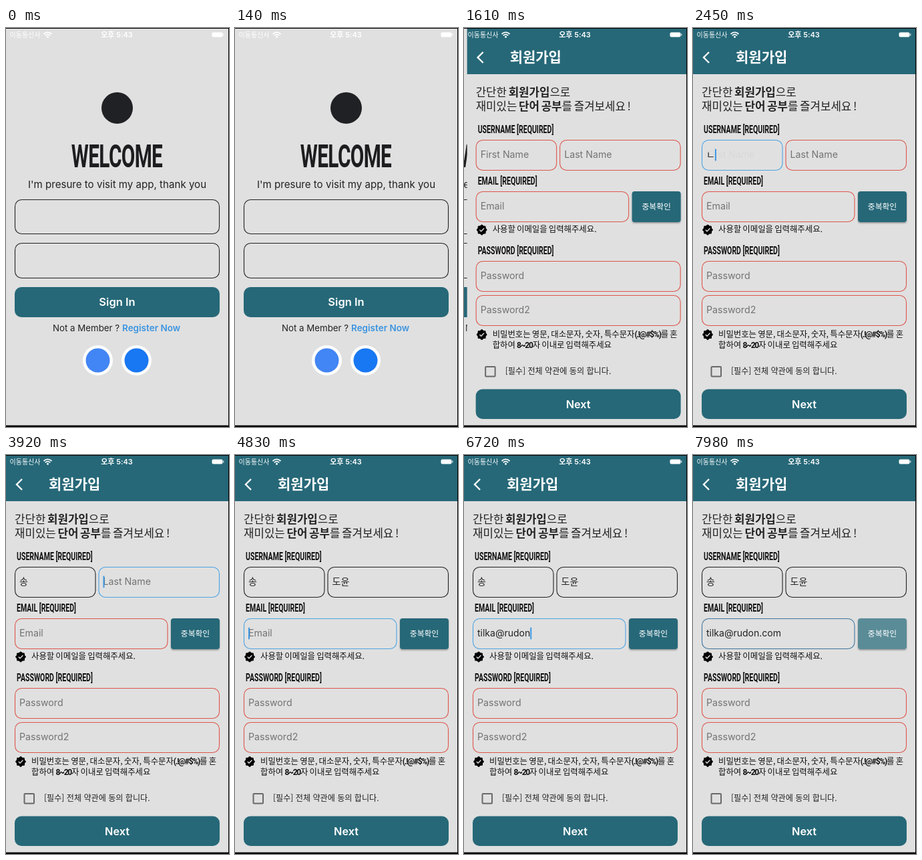
An HTML page for the animation above (8000 ms loop, 334 by 596 pixels).

```html
<!DOCTYPE html>
<html lang="ko">
<head>
<meta charset="utf-8">
<title>Sign up</title>
<style>
  html, body { margin: 0; width: 100%; height: 100%; overflow: hidden; background: #e0e0e0; }
  svg { display: block; width: 334px; height: 596px; font-family: Inter, "Noto Sans CJK KR", "Noto Sans CJK", sans-serif; }
  text { white-space: pre; fill: #222; }
  .ko { font-family: "Noto Sans CJK KR", "Noto Sans CJK", sans-serif; }
  .cond { font: 700 17px Roboto, sans-serif; fill: #111; }
  .box { fill: none; stroke: #222; stroke-width: 1.1; }
  .red { stroke: #dd564c; }
  .teal { fill: #266878; }
  .mid { text-anchor: middle; }
  .in { font-size: 14px; }
  .hint { font-size: 14.2px; fill: #737373; }
  .white { fill: #fff; }
  .semi { font-weight: 600; }
  .bold { font-weight: 700; }
  .lead { font-size: 16.8px; word-spacing: -2px; }
  .note { font-size: 12.4px; font-weight: 500; word-spacing: -1.3px; fill: #111; }
  .sym { font-family: Roboto, sans-serif; font-size: 12px; font-weight: 700; letter-spacing: -1.2px; }
  .cursor { fill: #3b97e3; }
</style>
</head>
<body>
<svg viewBox="0 0 334 596">
  <defs>
    <filter id="drop" x="-10%" y="-10%" width="120%" height="130%">
      <feDropShadow dx="0" dy="1.5" stdDeviation="1.2" flood-opacity=".35"/>
    </filter>
    <g id="badge">
      <rect x="-6" y="-6" width="12" height="12" rx="1.5"/>
      <rect x="-6" y="-6" width="12" height="12" rx="1.5" transform="rotate(45)"/>
      <path d="M-3.2 0 L-1 2.3 L3.4 -2.2" fill="none" stroke="#e0e0e0" stroke-width="1.4"/>
    </g>
  </defs>
  <rect width="334" height="596" fill="#e0e0e0"/>

  <g id="login">
    <circle cx="166.5" cy="119.5" r="23.5" fill="#202124"/>
    <text class="cond mid" transform="translate(166 208) scale(.62 1)" style="font-size:48px;letter-spacing:-1px;fill:#1d1d1f">WELCOME</text>
    <text class="mid" x="166.5" y="239" font-size="15.1">I'm presure to visit my app, thank you</text>
    <rect class="box" x="13.5" y="256.5" width="306" height="51" rx="10"/>
    <rect class="box" x="13.5" y="321.5" width="306" height="52" rx="10"/>
    <rect class="teal" x="13" y="387" width="307" height="45" rx="10"/>
    <text class="mid semi white" x="166.5" y="415" font-size="16.5">Sign In</text>
    <text x="70" y="453" font-size="13.3">Not a Member ?</text>
    <text class="semi" x="174" y="453" font-size="13.5" style="fill:#3b94e0">Register Now</text>
    <circle class="white" cx="137.5" cy="496.5" r="22.5"/>
    <circle cx="137.5" cy="496.5" r="18" fill="#4285f4"/>
    <circle class="white" cx="195.5" cy="496.5" r="22.5"/>
    <circle cx="195.5" cy="496.5" r="18" fill="#1877f2"/>
  </g>

  <g id="form" transform="translate(400)">
    <rect width="334" height="596" fill="#e0e0e0"/>
    <rect class="teal" width="334" height="69"/>
    <path d="M24 36 L16 44 L24 52" fill="none" stroke="#fff" stroke-width="2.4"/>
    <text class="ko bold white" x="64" y="50.5" font-size="21">회원가입</text>
    <text class="ko lead" x="13" y="102">간단한 <tspan class="bold">회원가입</tspan>으로</text>
    <text class="ko lead" x="13" y="123">재미있는 <tspan class="bold">단어 공부</tspan>를 즐겨보세요 !</text>
    <text class="cond" transform="translate(16 157) scale(.62 1)">USERNAME [REQUIRED]</text>
    <text class="cond" transform="translate(16 234) scale(.62 1)">EMAIL [REQUIRED]</text>
    <text class="cond" transform="translate(16 338) scale(.62 1)">PASSWORD [REQUIRED]</text>

    <g id="fields"></g>

    <rect id="check" class="teal" x="247" y="244" width="73" height="46" rx="4" filter="url(#drop)"/>
    <text class="ko mid white" x="283.5" y="271" font-size="11.8">중복확인</text>
    <use href="#badge" x="22" y="301.5"/>
    <text class="ko note" x="38" y="305">사용할 이메일을 입력해주세요.</text>

    <rect class="box red" x="13.5" y="348.5" width="306" height="45" rx="10"/>
    <text class="hint" x="20" y="375">Password</text>
    <rect class="box red" x="13.5" y="399.5" width="306" height="45" rx="10"/>
    <text class="hint" x="20" y="426">Password2</text>
    <use href="#badge" x="22" y="458"/>
    <text class="ko note" x="38" y="462">비밀번호는 영문, 대소문자, 숫자, 특수문자<tspan class="sym">(.!@#$%)</tspan>를 혼</text>
    <text class="ko note" x="38" y="478">합하여 <tspan class="sym">8~20</tspan>자 이내로 입력해주세요</text>

    <rect x="27.5" y="506" width="14.5" height="14.5" rx="1" fill="none" stroke="#696969" stroke-width="2"/>
    <text class="ko" x="57" y="517" font-size="12.1">[필수] 전체 약관에 동의 합니다.</text>
    <rect class="teal" x="13" y="539.5" width="307" height="44.5" rx="10"/>
    <text class="mid semi white" x="166.5" y="567.5" font-size="16.3">Next</text>
  </g>

  <g id="popup" opacity="0">
    <rect x="101" y="254" width="131" height="87" rx="6" fill="#f3f3f3" fill-opacity=".86" filter="url(#drop)"/>
    <path d="M101 298 V260 a6 6 0 0 1 6 -6 H226 a6 6 0 0 1 6 6 V298 Z" fill="#3d92f2"/>
    <text class="mid white" x="166.5" y="282" font-size="15.5">English (US)</text>
    <text class="ko mid" x="166.5" y="326" font-size="15.5">한국어</text>
  </g>

  <g id="status" class="white">
    <text class="ko white" x="5.5" y="14" font-size="10">이동통신사</text>
    <g fill="none" stroke="#fff" stroke-width="1.8">
      <path d="M56.5 9 Q62.5 3.8 68.5 9"/>
      <path d="M58.8 11.3 Q62.5 8 66.2 11.3"/>
    </g>
    <circle cx="62.5" cy="13.2" r="1.5"/>
    <text class="mid semi white" x="166" y="14" font-size="11">오후 5:43</text>
    <rect x="308.5" y="6.5" width="16" height="7" rx="2"/>
    <rect x="325.3" y="8.5" width="1" height="3"/>
  </g>
  <path d="M0 0 H334 V596 H0 V593.5 H333 V1 H0 Z"/>
</svg>
<script>
const LOOP = 8000, STEP = 70;
const RED = [221, 86, 76], BLUE = [77, 163, 226], DARK = [34, 34, 34];
const $ = id => document.getElementById(id);
const clamp = v => Math.max(0, Math.min(1, v));
const mix = (a, b, k) => `rgb(${a.map((v, i) => Math.round(v + (b[i] - v) * k))})`;

const email = 'tilka@rudon.com';
const emailTimes = [5390, 5460, 5530, 5740, 5880, 6020, 6300, 6440, 6510, 6650, 6720, 7140, 7350, 7490, 7700];

const fields = [
  { x: 13.5, y: 167.5, w: 120.5, hint: 'First Name', focus: 2050, blur: 3780,
    typed: [[2380, 'ㄴ'], [2940, ''], [3150, 'ㅅ'], [3220, '소'], [3290, '송']] },
  { x: 139, y: 167.5, w: 180.5, hint: 'Last Name', focus: 3780, blur: 4690,
    typed: [[4130, 'ㄷ'], [4200, '도'], [4410, '도ㅇ'], [4480, '도유'], [4550, '도윤']] },
  { x: 13.5, y: 244.5, w: 228.5, hint: 'Email', focus: 4690, blur: 7930,
    typed: emailTimes.map((at, i) => [at, email.slice(0, i + 1)]) }
];

function add(tag, attrs, text = '') {
  const el = document.createElementNS('http://www.w3.org/2000/svg', tag);
  for (const key in attrs) el.setAttribute(key, attrs[key]);
  el.textContent = text;
  return $('fields').appendChild(el);
}

for (const f of fields) {
  const x = f.x + 6.5, y = f.y + 26.5;
  f.box = add('rect', { class: 'box', x: f.x, y: f.y, width: f.w, height: 45, rx: 10 });
  f.label = add('text', { class: 'hint', x, y }, f.hint);
  f.value = add('text', { class: 'in', x, y });
  f.cursor = add('rect', { class: 'cursor', y: f.y + 13, width: 2, height: 18, rx: 1 });
}

function drawField(f, t) {
  let text = '', since = -LOOP;
  for (const [at, s] of f.typed) {
    if (at > t) break;
    if (!s !== !text) since = at;
    text = s;
  }
  const fade = clamp((t - since + 70) / 150);
  f.label.setAttribute('opacity', text ? 1 - fade : fade);
  if (f.value.textContent !== text) f.value.textContent = text;

  const shift = start => clamp((t - start) / 140);
  f.box.style.stroke = t > f.blur ? mix(BLUE, DARK, shift(f.blur)) : mix(RED, BLUE, shift(f.focus));

  const width = text ? f.value.getComputedTextLength() : 0;
  f.cursor.setAttribute('x', f.x + 6.5 + width);
  f.cursor.setAttribute('opacity', t > f.focus && t < f.blur ? 1 : 0);
}

function draw(now) {
  // The screen refreshes in fixed steps.
  const t = Math.floor(now % LOOP / STEP) * STEP;

  let x = 334;
  if (t >= 1470) x = t < 1680 ? 29 * 0.4 ** ((t - 1470) / STEP) : 0;
  $('form').setAttribute('transform', `translate(${x})`);
  $('login').setAttribute('transform', `translate(${(x - 334) * 0.32})`);

  fields.forEach(f => drawField(f, t));
  $('popup').setAttribute('opacity', clamp((t - 4830) / 140) * clamp((5530 - t) / 150));
  $('check').style.fill = t >= 7980 ? '#5a8c98' : '';
}

const start = performance.now();
function tick() {
  draw(performance.now() - start);
  requestAnimationFrame(tick);
}
tick();
</script>
</body>
</html>
```
